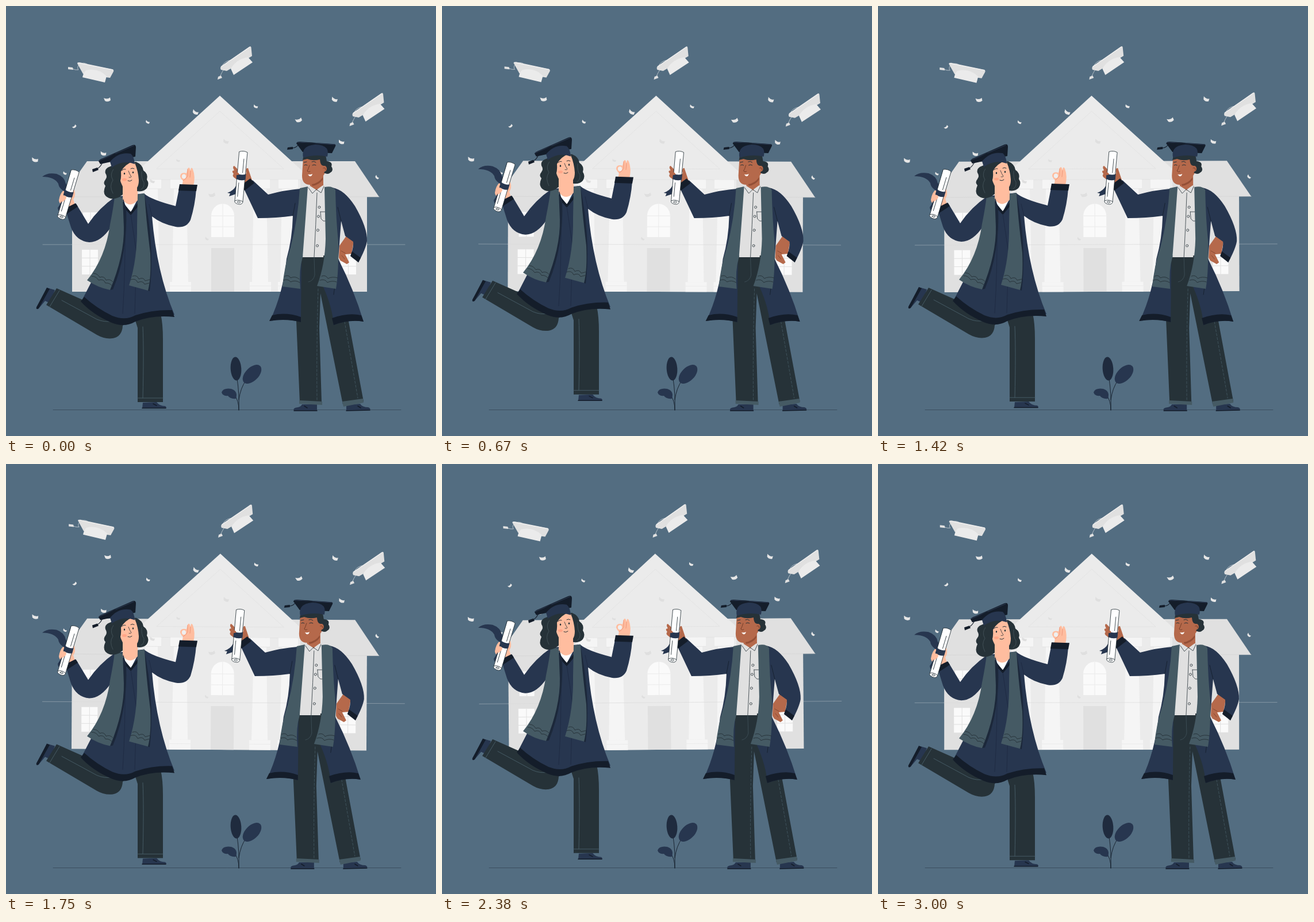
Write an HTML page with a canvas that moves like this. It is 748 px wide and 748 px high and loops after 3040 ms.

```html
<!DOCTYPE html>
<html lang="en">
<head>
<meta charset="utf-8">
<title>Graduation day</title>
<style>
html, body { margin: 0; width: 100%; height: 100%; overflow: hidden; background: #536d81; }
canvas { display: block; width: 748px; height: 748px; }
</style>
</head>
<body>
<canvas id="stage" width="748" height="748"></canvas>
<script>
const g = document.getElementById('stage').getContext('2d');
const LOOP = 3040;
const BG = '#536d81', NAVY = '#27364f', DARK = '#141d2a', COAL = '#263238', STOLE = '#455a64',
      PEACH = '#ffbd9f', BROWN = '#b5694b', G1 = '#ebebeb', G2 = '#e0e0e0', G3 = '#f5f5f5', G4 = '#fafafa';

const fill = (color, d) => { g.fillStyle = color; g.fill(new Path2D(d)); };
const line = (color, width, d, dash = []) => {
  g.strokeStyle = color; g.lineWidth = width; g.setLineDash(dash);
  g.stroke(new Path2D(d));
};
const rect = (color, x, y, w, h) => { g.fillStyle = color; g.fillRect(x, y, w, h); };
const oval = (color, x, y, rx, ry = rx, rot = 0) => {
  g.fillStyle = color; g.beginPath(); g.ellipse(x, y, rx, ry, rot, 0, 7); g.fill();
};
const group = (x, y, draw, rot = 0) => {
  g.save(); g.translate(x, y); g.rotate(rot); draw(); g.restore();
};

// Smooth periodic curve through [phase, value] keys.
function curve(keys, p) {
  const n = keys.length;
  const key = i => {
    const turn = Math.floor(i / n), k = keys[i - turn * n];
    return [k[0] + turn, k[1]];
  };
  let i = 0;
  while (i < n - 1 && keys[i + 1][0] <= p) i++;
  const [a, b, c, d] = [-1, 0, 1, 2].map(o => key(i + o));
  const h = c[0] - b[0], u = (p - b[0]) / h;
  const m = (c[1] - a[1]) / (c[0] - a[0]) * h, k = (d[1] - b[1]) / (d[0] - b[0]) * h;
  const u2 = u * u, u3 = u2 * u;
  return b[1] * (2 * u3 - 3 * u2 + 1) + m * (u3 - 2 * u2 + u) + c[1] * (3 * u2 - 2 * u3) + k * (u3 - u2);
}

const TILT = [[0, 0], [.14, .3], [.27, .46], [.368, .38], [.441, .18], [.55, -.38], [.658, -.73], [.757, -.75], [.934, -.2]];
const HOP = [[0, 0], [.12, -2.5], [.25, -7.3], [.368, -11.8], [.45, -13.4], [.54, -12.8], [.658, -9.2], [.76, -5.3], [.934, -.9], [.975, .3]];
const SWAY = [[0, 0], [.1, .9], [.22, .6], [.329, -1.6], [.467, -3.8], [.59, -5.3], [.684, -5.8], [.79, -4], [.878, -1.7], [.96, -.2]];

function pane(x, y, w, h) {
  rect(G4, x, y, w, h);
  line(G2, 1, `M${x + w / 2},${y}v${h}M${x},${y + h / 3}h${w}M${x},${y + h * 2 / 3}h${w}`);
}

function column(x) {
  fill(G3, `M${x - 11},318L${x + 11},318L${x + 14},480L${x - 14},480Z`);
  rect(G3, x - 17, 302, 34, 16);
  line(G2, .7, `M${x - 17},318h34`);
  rect(G3, x - 18, 480, 37, 17);
  line(G1, 1, `M${x - 18},487h37`);
}

function tossedCap() {
  line('#c9d0d5', .8, 'M392,94C380,95 372,105 379,110Q375,116 372,123');
  fill(G2, 'M374,121L376,125L368,128L369,123Z');
  fill(G2, 'M423,71Q426,69 426.5,72L428,87L384,113L374,111Q372,108 374,105Z');
  line('#f2f2f2', 1, 'M424,71.5L375,105');
  fill(G1, 'M391,109Q401,92 421,89L429,98L396,120Z');
}

const PAPER = [
  [176, 163, 1, 0], [119, 210, .65, -.6], [246, 202, .65, .6], [329, 185, .95, .6], [434, 175, .7, .5],
  [571, 163, .95, .5], [509, 199, 1, -.2], [583, 237, .9, .4], [645, 298, .65, .9], [50, 268, 1, .3],
  [102, 291, .6, .6], [169, 257, .9, .3],
  [382, 236, .9, .5, 1], [299, 269, .6, .4, 1], [254, 305, .8, .5, 1], [358, 329, 1, -.1, 1], [349, 405, .6, .7, 1]
];

function building() {
  rect(G2, 115, 325, 513, 172);
  fill(G2, 'M141,270H607L649,332H97Z');
  line('#d3d3d3', .7, 'M97,332H649');
  rect(G1, 232, 290, 280, 207);
  fill(G1, 'M372,156L519,290L519,302H225L225,290Z');
  line('#e1e1e1', .8, 'M262,283L372,183L483,283ZM225,302H519');
  [253, 303, 442, 491].forEach(column);
  fill(G4, 'M357,402V365A20,21 0 0 1 397,365V402Z');
  line(G1, 1, 'M377,344V402M357,365H397M357,384H397');
  rect(G2, 357, 421, 40, 76);
  pane(132, 424, 28, 43);
  pane(134, 359, 26, 43);
  pane(582, 424, 27, 43);
  line('#91a1ad', .8, 'M64,415H115M628,415H694');
  line('#dadada', .7, 'M115,415H628');

  line('#c9d0d5', .8, 'M141,101C131,95 121,105 126,111Q121,112 115,109');
  fill(G2, 'M108,106L116,107L117,111L108,110Z');
  fill(G2, 'M124,100Q124,98 128,98L185,110Q188,111 187,114L181,125L134,118Z');
  line('#f2f2f2', 1, 'M125,99L186,111');
  fill(G1, 'M139,112Q160,107 175,122L172,133L133,124Q135,115 139,112Z');
  tossedCap();
  group(229.5, 81, tossedCap);

  for (const [x, y, k, rot, pale] of PAPER) group(x, y, () => {
    g.scale(k, k);
    fill(pale ? '#dfdfdf' : '#e6e6e6', 'M-6,-3Q1,0 5,-4L6,1Q1,5 -4,2Z');
  }, rot);
}

function plant() {
  line('#324252', .7, 'M82,702.5H687');
  line(DARK, .9, 'M405,703Q406,674 402,648M405,685Q408,664 417,652M405,703Q405,686 398,678');
  oval('#1f2b3e', 400, 631, 9.3, 20.5, -.06);
  oval(NAVY, 428, 640.5, 11.5, 20, .78);
  fill(NAVY, 'M375,672Q378,664 392,666Q404,670 400,683Q390,684 386,678Q377,679 375,672Z');
}

function diploma(x, y, rot, len) {
  const sheet = `M-7,0Q0,-3 7,0V${len - 3}Q6,${len + 2} -1,${len + 1}Q-8,${len} -7,${len - 4}Z`;
  group(x, y, () => {
    fill('#fff', sheet);
    line(COAL, .8, sheet);
    line(COAL, .8, `M-7,${len - 4}Q0,${len - 8} 7,${len - 4}M-3,${len - 2}Q0,${len - 6} 3,${len - 3}Q2,${len} -2,${len - 2}M2,12V${len * .4}M-3,${len * .6}V${len - 12}`);
    fill(NAVY, `M-8,${len * .42}Q0,${len * .46} 8,${len * .42}V${len * .53}Q0,${len * .57} -8,${len * .53}Z`);
  }, rot);
}

function woman() {
  // lifted leg
  fill(NAVY, 'M71,490L85,494L77,517L68,513L56,527Q52,528 53,524L65,503Z');
  fill(DARK, 'M71,490L76,492L57,526Q52,529 53,524Z');
  fill(COAL, 'M88,491L142,515L228,535L203,556Q202,575 186,578Q172,580 158,572L70,520Z');
  line(STOLE, 1, 'M93,495L76,523M97,512L158,545Q172,551 185,548');
  // standing leg
  fill(NAVY, 'M238,690L262,689Q267,696 277,696Q280,698 278,700H237Z');
  line(DARK, 1.5, 'M237,699.5H278M256,692L262,695');
  fill(COAL, 'M222,538L269,536Q273,552 273,580V689H229V560Z');
  line(STOLE, 1, 'M229,682H273M238,558Q240,600 238,682');
  // raised hands
  fill(PEACH, 'M120,346L108,354Q92,345 92,338Q94,325 101,320L119,320Q122,330 117,336Z');
  fill(PEACH, 'M306,313L326,313Q330,297 325,284Q322,278 321,287Q319,278 316,283L314,291Q303,288 303,297Q305,302 308,304Z');
  oval('#efefef', 309.5, 296.5, 3.6, 4);
  line('#e98f73', .8, 'M321,287L320,298M316,284L316,296Q312,302 308,304');
  // gown
  fill(NAVY, 'M190,332L240,326Q252,337 295,348L301,318H331Q329,346 321,372Q314,387 295,384Q270,379 254,366Q262,463 293,537Q258,536 225,547Q207,558 186,550Q155,538 131,514L165,448Q184,405 183,384Q165,411 145,411Q122,409 113,385L104,356L122,344L143,379Q162,351 190,332Z');
  fill(DARK, 'M136,506Q158,526 185,539Q207,548 225,538Q255,528 289,529L293,541Q255,537 225,549Q206,560 184,551Q151,537 130,514Z');
  fill(DARK, 'M103,352L121,343L125,349L105,362Z');
  fill(DARK, 'M302,310L333,311L331,322L300,321Z');
  line('#1d2940', .8, 'M207,366Q208,460 203,535M217,362L227,430L224,535M184,383Q185,365 188,350M254,366L249,345');
  // shirt and neck
  fill('#fff', 'M202,339L229,336L217,359Z');
  fill(PEACH, 'M203,310V337Q215,353 229,338V315Z');
  line(DARK, 4, 'M203,345L217,361L230,345');
  // stole
  fill('#1c283a', 'M204,335L209,352Q212,430 186,493L181,494Z');
  fill('#1c283a', 'M241,328L245,352Q258,430 250,496L247,495Z');
  fill(STOLE, 'M189,331L203,333L205,385Q206,434 181,494Q160,490 141,477Q173,438 181,380Q187,350 189,331Z');
  fill(STOLE, 'M229,328L241,326Q243,365 251,430Q253,472 247,495L214,486Q229,440 228,380Z');
  line(COAL, .9, 'M152,465Q159,465 163,472Q171,469 174,477Q181,474 186,480M149,470Q157,470 161,477Q170,474 173,482Q179,481 184,486M220,470Q228,467 231,475Q239,471 242,478L250,476M217,476Q226,473 229,481Q238,477 241,484L249,482');
  // ribbon and diploma
  fill(NAVY, 'M63,297Q72,289 88,292Q102,297 104,309L113,318L108,326Q92,319 91,309Q84,297 63,297Z');
  fill(NAVY, 'M101,327L106,331L99,352L91,356L90,351Q96,343 101,327Z');
  diploma(120.5, 287, .292, 86);
  fill(PEACH, 'M95,334Q97,328 103,330Q107,333 103,337L97,342Z');
  // head
  fill(COAL, 'M188,277Q170,281 173,291Q177,297 173,302Q168,308 173,313Q168,324 173,330Q182,339 196,333L203,328V312H228V322Q239,324 245,317Q250,309 245,302Q248,292 239,286Q238,276 226,271Z');
  fill(PEACH, 'M196,284Q207,268 224,273Q230,287 231,303Q231,318 221,321Q209,322 203,314Q196,301 196,284Z');
  line('#48575e', .8, 'M187,284Q180,293 186,303Q179,313 186,326M236,288Q235,301 240,307Q241,316 235,319');
  fill(COAL, 'M186,279Q200,267 222,270Q207,275 200,288Q201,302 197,309Q190,298 186,279Z');
  line(COAL, 1, 'M202,286Q204,283 208,284M217,283Q220,281 223,283M212,304Q216,306 219,303');
  line(COAL, .8, 'M213,287Q215,293 218,297Q217,299 214,298');
  oval(COAL, 206, 291.5, 1.2, 1.8);
  oval(COAL, 221, 289.5, 1.2, 1.8);
  oval('#ffa688', 206, 302, 4, 2.4);
  // cap
  fill(DARK, 'M161,270Q162,267 168,265L220,242Q226,240 226,246L225,262L178,272L164,275Z');
  fill(NAVY, 'M181,271Q196,253 217,257Q223,262 224,275Q203,267 184,281Z');
  line('#2c3b54', 1, 'M162,269L222,243');
  line(DARK, 1.1, 'M190,257Q172,266 167,274Q164,280 159,283');
  fill(DARK, 'M159,281L161,285L151,289L150,284Z');
}

function man() {
  // shoes and trousers
  fill(NAVY, 'M515,693H541V704H501Q498,699 508,698Q513,697 515,693Z');
  fill(NAVY, 'M592,694L616,692Q620,698 630,698Q635,700 633,703L592,704Z');
  line(DARK, 1.5, 'M501,704H541M592,704L633,703M519,696L524,699M612,696L617,699');
  fill(COAL, 'M513,434H556L566,485L596,549L622,688L586,693L547,500L545,560L549,689H511L505,548Q512,505 513,434Z');
  fill(STOLE, 'M510,686L550,688V694L510,692Z');
  fill(STOLE, 'M585,688L621,683L622,690L587,697Z');
  line(STOLE, .8, 'M543,492Q540,590 541,686M589,549L612,682', [4, 3]);
  line('#3b4c54', 1, 'M536,437L537,468Q535,478 526,480');
  // hands
  fill(BROWN, 'M592,400L605,409L601,431L590,432L597,446L593,449L582,443L579,438L580,417Z');
  line('#7b412d', .8, 'M590,430L583,426M589,440L584,434');
  fill(BROWN, 'M414,314L428,303L421,282Q416,281 418,291L414,295L397,278Q393,279 397,286Q391,286 396,292Q392,296 399,300Z');
  // gown
  fill(NAVY, 'M512,318Q485,320 456,328L429,303L412,314L438,369Q471,369 499,365Q498,405 488,440Q482,500 459,548Q487,542 513,550L514,437L523,320Z');
  fill(NAVY, 'M568,316Q588,319 607,348Q629,386 628,409Q626,422 613,446L600,433Q605,418 604,410L590,400L583,374L578,440Q605,493 622,549Q597,544 570,555Q568,525 552,489L555,430Z');
  fill(DARK, 'M463,538Q487,532 513,541V550Q487,543 458,548Z');
  fill(DARK, 'M567,543Q595,533 618,538L622,549Q597,545 570,555Z');
  fill(DARK, 'M410,311L425,300L432,308L415,321Z');
  fill(DARK, 'M602,427L617,438L613,446L599,435Z');
  line(DARK, .8, 'M499,365L503,343M583,374Q579,358 577,350M578,440L570,502');
  // shirt
  fill(G2, 'M525,316L553,313L556,340L552,437H516L520,370Z');
  line(COAL, .8, 'M541,325Q539,380 536,437M547,358H556M547,358L548,370L552,374H556');
  for (const [x, y] of [[545, 350], [543.5, 366], [542.5, 390], [541.5, 417]]) {
    g.strokeStyle = COAL; g.beginPath(); g.arc(x, y, 2, 0, 7); g.stroke();
  }
  fill(BROWN, 'M528,304L552,294V313L541,321L529,314Z');
  fill(G2, 'M525,315L529,313L540,320L551,312L554,314L548,325L540,319L533,326Z');
  line(COAL, .8, 'M526,316L533,326L540,319L548,325L553,314');
  // stole
  fill(STOLE, 'M511,317L525,314L521,370L516,437Q509,460 512,492L481,488Q484,453 495,420Q508,370 511,317Z');
  fill(STOLE, 'M554,315Q568,312 573,320Q574,370 578,410Q579,463 574,492L541,487Q555,450 556,405Z');
  line(COAL, .9, 'M485,470Q492,467 495,473Q503,469 510,475M483,477Q491,474 495,480Q503,476 511,481M549,470Q556,467 560,474Q568,470 577,473M546,477Q555,474 559,481Q567,477 575,480');
  // diploma
  fill(NAVY, 'M404,311L405,322L400,327L388,331L390,326L385,325Q396,321 400,313Z');
  diploma(413, 254, .094, 90);
  fill(BROWN, 'M397,289Q404,288 406,293Q401,295 396,294Z');
  // head
  fill(BROWN, 'M517,263L515,295Q515,311 529,311Q544,309 550,298L558,286L553,270L542,262Z');
  fill('#934f36', 'M532,310Q544,308 551,298V302Q545,311 533,313Z');
  fill(COAL, 'M516,268L518,259H556L558,270Q569,271 566,279Q571,286 564,290Q560,294 553,290Q559,283 553,278Q547,279 546,267Q534,270 524,266Z');
  oval(BROWN, 554, 283, 4, 5);
  line('#6e3925', .9, 'M552,282Q556,280 556,285');
  line(COAL, 1, 'M518,272L523,271M532,271Q536,269 539,272M519,277Q521,275 524,277M533,277Q536,275 539,277');
  line('#6e3925', .9, 'M528,277Q526,284 524,287Q526,290 529,288');
  fill('#fff', 'M525,293Q530,294 533,292Q532,297 528,296Z');
  // cap
  fill(DARK, 'M505,239Q506,236 511,236L569,240Q575,240 573,244L567,256L516,254Z');
  fill(NAVY, 'M519,249Q524,242 538,241Q552,241 558,248Q561,253 559,262Q538,257 517,264Q515,255 519,249Z');
  line('#2c3b54', 1, 'M507,237L572,241');
  line(DARK, 1.1, 'M538,239Q520,236 508,242Q504,247 498,247');
  fill(DARK, 'M499,245V249L489,250L490,246Z');
}

function draw() {
  const t = performance.now() % LOOP / LOOP, half = t * 2 % 1;
  g.lineCap = g.lineJoin = 'round';
  rect(BG, 0, 0, 748, 748);
  group(372, 312, () => group(-372, -312, building), curve(TILT, half) * Math.PI / 180);
  plant();
  group(0, curve(HOP, half), woman);
  group(curve(SWAY, t), 0, man);
  requestAnimationFrame(draw);
}
draw();
</script>
</body>
</html>
```
